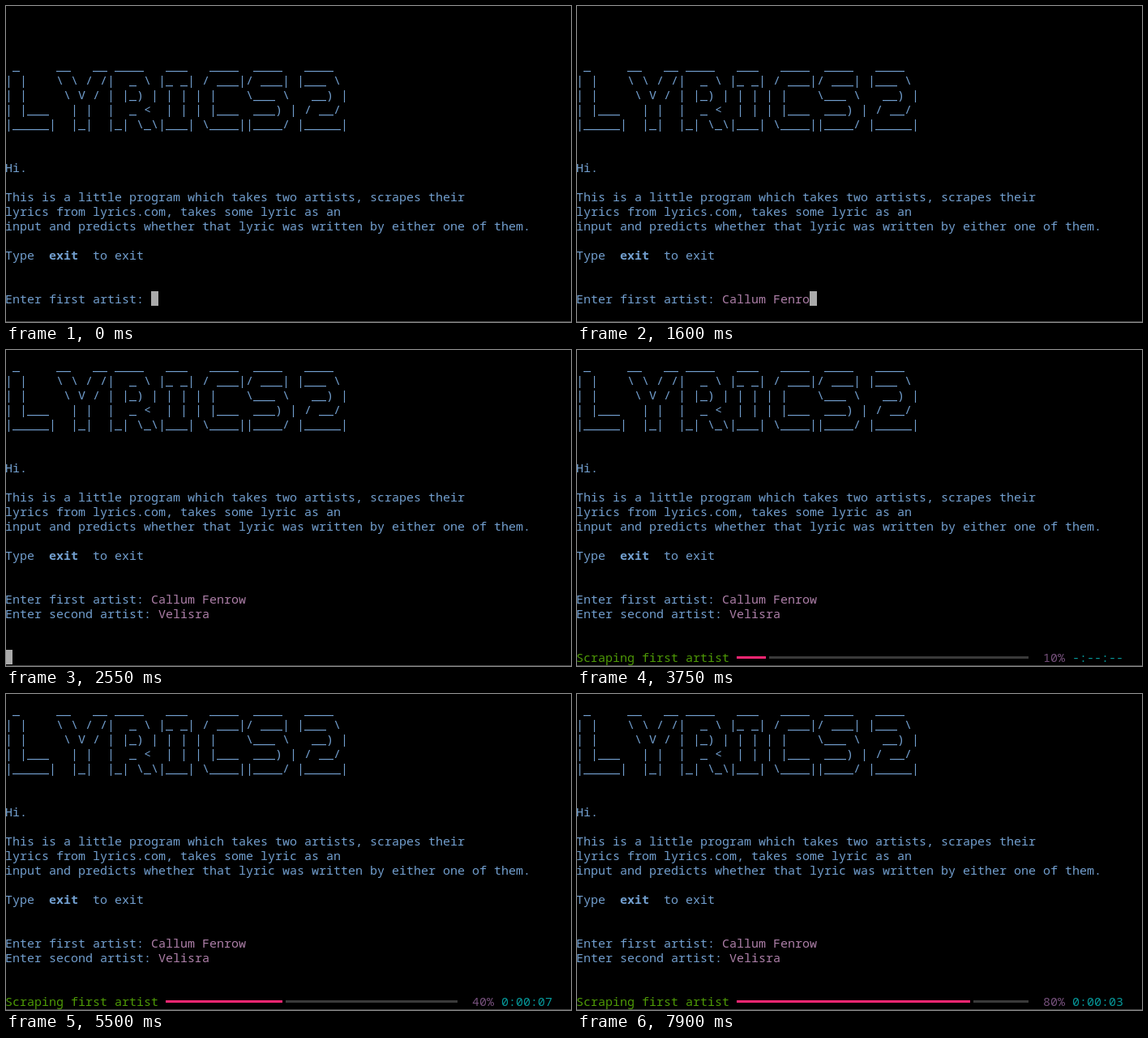
An HTML page with a canvas for the animation above (8000 ms loop, 697 by 390 pixels).

```html
<!DOCTYPE html>
<html lang="en">
<head>
<meta charset="utf-8">
<title>Lyrics terminal</title>
<style>
  html, body { margin: 0; width: 100%; height: 100%; overflow: hidden; background: #000; }
  canvas { display: block; }
</style>
</head>
<body>
<canvas id="stage" width="697" height="390"></canvas>
<script>
const ctx = document.getElementById('stage').getContext('2d');
const LOOP = 8000, CELL = 9, LINE = 18, LEFT = -1, TOP = 10;
const FONT = '15px "Noto Sans Mono", "DejaVu Sans Mono", monospace';
const BLUE = '#729fcf', PLUM = '#ad7fa8', GREEN = '#4e9a06', PURPLE = '#75507b',
      TEAL = '#06989a', PINK = '#f92672', GREY = '#3a3a3a', CURSOR = '#aaaaaa';

const FIRST = 'Callum Fenrow', SECOND = 'Velisra';
const INTRO = String.raw`
 _     __   __ ____   ___   ____  ____   ____  
| |    \ \ / /|  _ \ |_ _| / ___|/ ___| |___ \ 
| |     \ V / | |_) | | | | |    \___ \   __) |
| |___   | |  |  _ <  | | | |___  ___) | / __/ 
|_____|  |_|  |_| \_\|___| \____||____/ |_____|


Hi.

This is a little program which takes two artists, scrapes their
lyrics from lyrics.com, takes some lyric as an
input and predicts whether that lyric was written by either one of them.

Type        to exit`.split('\n').slice(1);

// [time, characters typed]
const TYPE_FIRST = [[950, 1], [1100, 2], [1150, 4], [1200, 6], [1300, 8],
                    [1450, 9], [1500, 10], [1550, 11], [1600, 12], [1750, 13]];
const TYPE_SECOND = [[2150, 1], [2200, 3], [2250, 4], [2300, 5], [2400, 7]];
// Start of each 10 % step
const STEPS = [3100, 3750, 4300, 4850, 5500, 6100, 6650, 7250, 7900];
const SCROLL = 2550;

const colX = col => LEFT + col * CELL;
const rowY = row => TOP + row * LINE;
const typed = (keys, t) => keys.reduce((n, [at, count]) => t >= at ? count : n, 0);

function text(str, col, row, color, bold) {
  ctx.font = (bold ? 'bold ' : '') + FONT;
  ctx.fillStyle = color;
  ctx.fillText(str, colX(col), rowY(row) + 15);
}

function box(x, y, w, h, color) {
  ctx.fillStyle = color;
  ctx.fillRect(x, y, w, h);
}

const cursor = (col, row) => box(colX(col), rowY(row), CELL, LINE, CURSOR);

function progress(t) {
  const step = STEPS.filter(at => t >= at).length - 1;
  if (step < 0) return;
  const start = colX(22), end = colX(62), y = rowY(20) + 8;
  const split = start + step * 4 * CELL;
  const rest = split + (step ? 4 : 0);
  text('Scraping first artist', 0, 20, GREEN);
  box(start, y, split - start, 3, PINK);
  box(rest, y, end - rest, 3, GREY);
  text((step * 10 + '%').padStart(4), 63, 20, PURPLE);
  text(step < 2 ? '-:--:--' : '0:00:0' + (11 - step), 68, 20, TEAL);
}

function draw(t) {
  const scrolled = t >= SCROLL, up = scrolled ? 3 : 0;
  box(0, 0, 697, 390, '#000');
  box(0, 389, 697, 1, '#444');

  INTRO.forEach((line, i) => text(line, 0, 3 + i - up, BLUE));
  text('exit', 6, 16 - up, BLUE, true);

  const a = typed(TYPE_FIRST, t), b = typed(TYPE_SECOND, t);
  const onSecond = t >= 1750;
  text('Enter first artist:', 0, 19 - up, BLUE);
  text(FIRST.slice(0, a), 20, 19 - up, PLUM);
  if (onSecond) {
    text('Enter second artist:', 0, 20 - up, BLUE);
    text(SECOND.slice(0, b), 21, 20 - up, PLUM);
  }

  if (scrolled) {
    if (t < 2850) cursor(0, 20);
    progress(t);
  } else if (onSecond) {
    cursor(21 + b, 20);
  } else if (t < 500 || t >= 600) {
    cursor(20 + a, 19);
  }
}

const origin = performance.now();
function tick() {
  draw((performance.now() - origin) % LOOP);
  requestAnimationFrame(tick);
}
tick();
</script>
</body>
</html>
```
